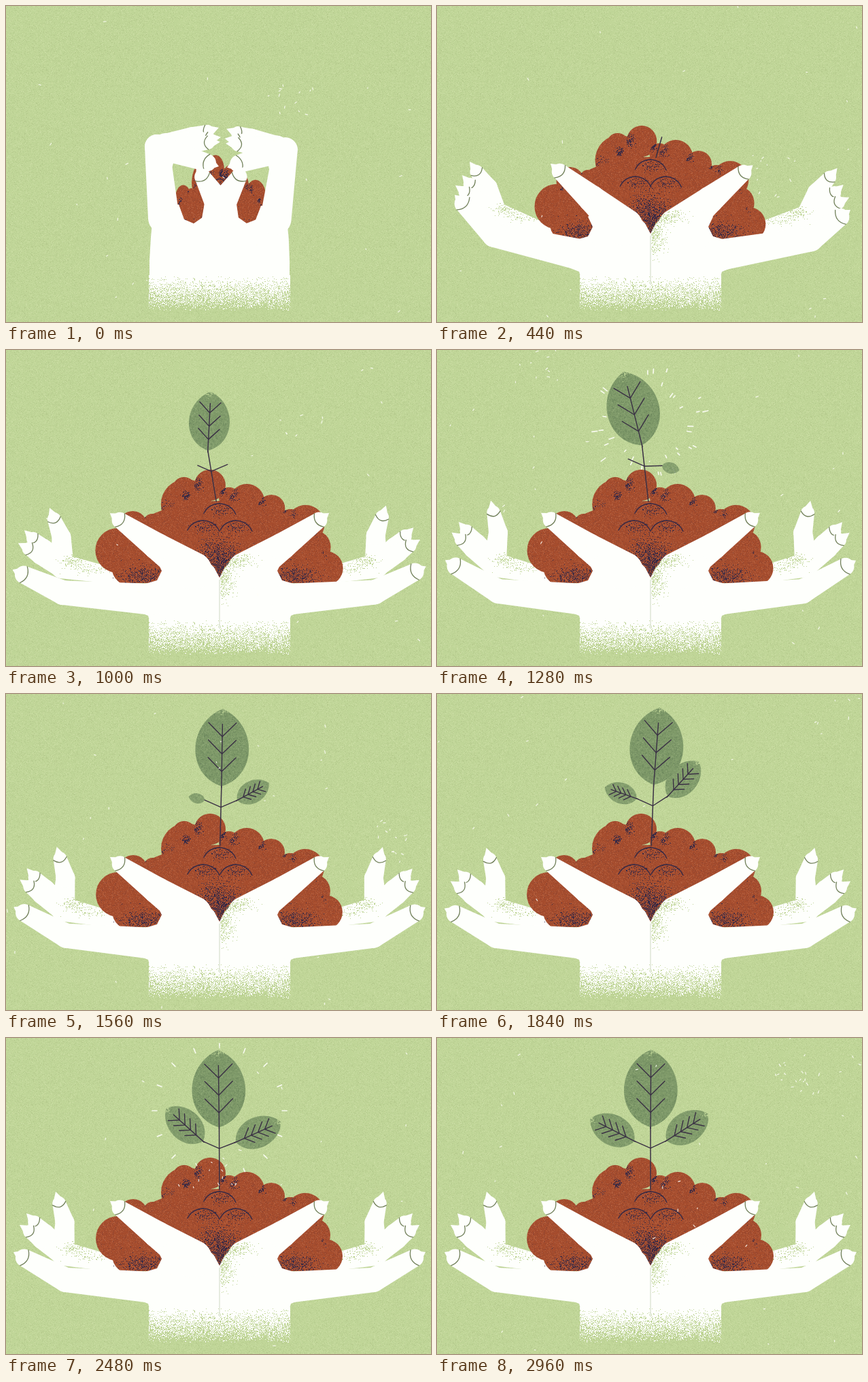
Animation of 625 by 465 pixels, one loop 3000 ms. Source, as an HTML page with a canvas:

```html
<!DOCTYPE html>
<html lang="en">
<head>
<meta charset="utf-8">
<title>Growing plant</title>
<style>
html, body { margin: 0; width: 100%; height: 100%; overflow: hidden; background: #bfd597; }
canvas { display: block; width: 625px; height: 465px; }
</style>
</head>
<body>
<canvas id="stage" width="625" height="465"></canvas>
<script>
const W = 625, H = 465, LOOP = 3000, STEP = 40, AXIS = 314, TAU = Math.PI * 2;
const ctx = document.getElementById('stage').getContext('2d');
const INK = '#3a3044', SHADE = '#382a45', NAIL = '#71805a', GREEN = '#bfd597', WHITE = '#fefffc';

// ---------- helpers ----------
function seeded(seed) {
  let s = seed * 2654435761 >>> 0;
  return () => {
    s = s + 0x6D2B79F5 >>> 0;
    let x = Math.imul(s ^ s >>> 15, s | 1);
    x ^= x + Math.imul(x ^ x >>> 7, x | 61);
    return ((x ^ x >>> 14) >>> 0) / 4294967296;
  };
}
const clamp = k => Math.max(0, Math.min(1, k));
const easeOut = k => 1 - (1 - k) ** 2;
const grow = (t, start, duration) => easeOut(clamp((t - start) / duration));
// Works on numbers, points, lists of points and objects of these.
function mix(a, b, k) {
  if (typeof a === 'number') return a + (b - a) * k;
  if (Array.isArray(a)) return a.map((v, i) => mix(v, b[i], k));
  return Object.fromEntries(Object.keys(a).map(key => [key, mix(a[key], b[key], k)]));
}
// Point at a distance from p; the angle is in degrees, clockwise from straight up.
const polar = (p, angle, r) => {
  const a = angle * Math.PI / 180;
  return [p[0] + Math.sin(a) * r, p[1] - Math.cos(a) * r];
};

function layer(w, h, paint) {
  const c = document.createElement('canvas');
  c.width = w; c.height = h;
  paint(c.getContext('2d'));
  return c;
}
function grain(seed, base, specks) {
  const tile = layer(256, 256, g => {
    const rnd = seeded(seed);
    g.fillStyle = base;
    g.fillRect(0, 0, 256, 256);
    for (let i = 0; i < 28000; i++) {
      g.fillStyle = specks[i % specks.length];
      g.fillRect(rnd() * 256 | 0, rnd() * 256 | 0, 1, 1);
    }
  });
  return ctx.createPattern(tile, 'repeat');
}
const paper = grain(1, GREEN, ['#c9dca2', '#b6cb8e', '#c4d89b']);
const earth = grain(2, '#a54c2d', ['#b5603f', '#934630', '#ab5434']);
const leafFill = grain(3, '#7f9a69', ['#6b865c', '#8fa877', '#758f63']);

const wristFade = layer(W, H, g => {
  const rnd = seeded(5);
  g.fillStyle = WHITE;
  for (let y = 396; y < 448; y++)
    for (let x = 210; x < 418; x++)
      if (rnd() > ((y - 396) / 52) ** 1.3) g.fillRect(x, y, 1, 1);
});

const scatter = (() => {
  const rnd = seeded(6);
  return Array.from({ length: 1600 }, () => {
    const r = Math.sqrt(-2 * Math.log(1 - rnd())), a = rnd() * TAU;
    return [r * Math.cos(a), r * Math.sin(a)];
  });
})();
function spray(x, y, rx, ry, n, color) {
  ctx.beginPath();
  for (const [dx, dy] of scatter.slice(0, n))
    ctx.rect(Math.round(x + dx * rx), Math.round(y + dy * ry), 1, 1);
  ctx.fillStyle = color;
  ctx.fill();
}
function line(points, color, width) {
  ctx.beginPath();
  points.forEach(p => ctx.lineTo(...p));
  ctx.strokeStyle = color;
  ctx.lineWidth = width;
  ctx.stroke();
}
function fillPoly(points) {
  ctx.beginPath();
  points.forEach(p => ctx.lineTo(...p));
  ctx.fillStyle = WHITE;
  ctx.fill();
}

// ---------- hands: a jointed left hand, mirrored for the right ----------
// soil holds the spread and height of the lumps, then their size both ways
const folded = {
  fold: 1, soil: [0.42, 0.72, 0.55, 0.9],
  root: [232, 312], knuckle: [222, 207], index: [313, 236],
  backRoot: [228, 255], backKnuckle: [235, 205], middle: [315, 200], ring: [316, 193], little: [313, 179],
  thumbRoot: [312, 335], thumbJoint: [312, 290], thumb: [280, 236]
};
const rest = {
  fold: 0, soil: [1, 1, 1, 1],
  root: [215, 367], knuckle: [88, 356], index: [11, 315],
  backRoot: [165, 334], backKnuckle: [84, 317], middle: [20, 275], ring: [30, 258], little: [73, 226],
  thumbRoot: [275, 325], thumbJoint: [222, 289], thumb: [153, 240]
};
const lifted = {
  ...rest, soil: [0.93, 1, 0.97, 1],
  knuckle: [84, 337], index: [26, 278], backKnuckle: [86, 306],
  middle: [27, 264], ring: [37, 249], little: [48, 229], thumbJoint: [228, 284], thumb: [167, 232]
};
const splayed = {
  ...rest, soil: [1.03, 1, 1, 1],
  knuckle: [60, 364], index: [1, 372], backKnuckle: [76, 327],
  middle: [5, 340], ring: [9, 309], little: [11, 270], thumb: [152, 242]
};
const openPalm = [[209,391], [192,384], [198,346], [222,339], [229,325], [222,310], [250,288], [288,302], [306,320], [315,337]];
const foldedPalm = [[211,375], [213,340], [217,300], [254,292], [262,314], [276,320], [289,311], [293,285], [308,272], [315,268]];

function poseAt(t) {
  if (t < 440) return mix(folded, lifted, (t / 440) ** 1.4);
  if (t < 760) return mix(lifted, splayed, easeOut((t - 440) / 320));
  const u = t - 760;
  return mix(rest, splayed, Math.exp(-u / 245) * Math.cos(u / 640 * Math.PI));
}
function taper(a, ra, b, rb) {
  const angle = Math.atan2(b[1] - a[1], b[0] - a[0]);
  ctx.beginPath();
  ctx.arc(...a, ra, angle + Math.PI / 2, angle - Math.PI / 2);
  ctx.arc(...b, rb, angle - Math.PI / 2, angle + Math.PI / 2);
  ctx.fillStyle = WHITE;
  ctx.fill();
}
function finger(root, joint, tip, [r0, r1, r2]) {
  const len = Math.hypot(tip[0] - joint[0], tip[1] - joint[1]);
  const ux = (tip[0] - joint[0]) / len, uy = (tip[1] - joint[1]) / len;
  const end = [tip[0] - ux * 18, tip[1] - uy * 18];
  const sides = [-1, 1].map(s => [end[0] - uy * r2 * s, end[1] + ux * r2 * s]);
  taper(root, r0, joint, r1);
  taper(joint, r1, end, r2);
  fillPoly([sides[0], tip, sides[1]]);
  ctx.beginPath();
  ctx.moveTo(...sides[0]);
  ctx.quadraticCurveTo(end[0] - ux * 11, end[1] - uy * 11, ...sides[1]);
  ctx.strokeStyle = NAIL;
  ctx.lineWidth = 1.3;
  ctx.stroke();
}
function drawBack(p) {
  taper(p.backRoot, 11, p.backKnuckle, 18);
  for (const name of ['little', 'ring', 'middle']) {
    const joint = mix(p.backKnuckle, p[name], 0.5);
    if (name === 'little') joint[0] += 8 * (1 - p.fold);
    finger(p.backKnuckle, joint, p[name], [17, 14, 10]);
  }
  if (p.fold < 0.3) {
    const [x, y] = p.backKnuckle;
    spray(x + 14, y - 8, 10, 5, 150, GREEN);
    spray(x + 40, y + 4, 17, 4, 90, GREEN);
  }
}
function drawFront(p) {
  fillPoly([[211, 398], ...mix(openPalm, foldedPalm, p.fold), [315, 398]]);
  finger(p.root, p.knuckle, p.index, [23, 18, 13]);
  finger(p.thumbRoot, p.thumbJoint, p.thumb, [28, 20, 12]);
}
function bothSides(draw, left, right) {
  draw(left);
  ctx.save();
  ctx.translate(AXIS * 2, 0);
  ctx.scale(-1, 1);
  draw(right);
  ctx.restore();
}

// ---------- soil: lumps from left to right, each shaded where it meets the last ----------
const lumps = [[165,295,33], [187,258,21], [215,253,12], [265,227,37], [262,204,17], [300,199,23],
  [328,217,15], [354,223,26], [390,233,20], [418,250,16], [440,256,28], [452,290,25], [470,321,25]];

function drawSoil([sx, sy, rx, ry]) {
  const X = x => AXIS + (x - AXIS) * sx, Y = y => 345 + (y - 345) * sy;
  const oval = (x, y, a, b, from = 0, to = 2) => {
    ctx.beginPath();
    ctx.ellipse(X(x), Y(y), a, b, 0, Math.PI * from, Math.PI * to);
  };
  ctx.save();
  ctx.beginPath();
  ctx.rect(0, 0, W, 343);
  ctx.clip();
  ctx.fillStyle = earth;
  lumps.forEach(([x, y, r], i) => {
    ctx.save();
    oval(x, y, r * rx, r * ry);
    ctx.fill();
    ctx.clip();
    if (i) {
      const [px, py] = lumps[i - 1], d = Math.hypot(px - x, py - y);
      spray(X(x + (px - x) / d * r * 0.9), Y(y + (py - y) / d * r * 0.9 - 4), r * rx / 5, r * ry / 4, 110, SHADE);
      ctx.fillStyle = earth;
    }
    ctx.restore();
  });
  for (const side of [-1, 1]) {
    oval(AXIS + side * 128, 320, 30 * rx, 28 * ry);
    ctx.fill();
  }
  oval(AXIS, 302, 150 * sx, 80 * sy);
  ctx.fill();
  for (const side of [-1, 1]) spray(X(AXIS + side * 111), Y(333), 17 * rx, 8 * ry, 480, SHADE);
  spray(X(AXIS), Y(315), 16 * rx, 19 * ry, 1600, SHADE);
  ctx.strokeStyle = SHADE;
  ctx.lineWidth = 1.4;
  for (const side of [-1, 0, 1]) {
    const x = AXIS + side * 24, y = side ? 277 : 252;
    oval(x, y, 26 * rx, 26 * ry, 1.15, 1.87);
    ctx.stroke();
    spray(X(x), Y(y - 17), 9 * rx, 5 * ry, 90, SHADE);
  }
  ctx.restore();
}

// ---------- plant ----------
function drawLeaf(base, angle, len, ratio, pairs) {
  if (len < 4) return;
  ctx.save();
  ctx.translate(...base);
  ctx.rotate((angle - 90) * Math.PI / 180);
  const h = len * ratio * 0.667;
  ctx.beginPath();
  ctx.moveTo(0, 0);
  ctx.bezierCurveTo(len * 0.14, -h, len * 0.8, -h, len, 0);
  ctx.bezierCurveTo(len * 0.8, h, len * 0.14, h, 0, 0);
  ctx.globalAlpha = 0.85 + 0.15 * clamp(len / 70 - 0.5);
  ctx.fillStyle = leafFill;
  ctx.fill();
  ctx.globalAlpha = 1;
  if (len > 60) spray(len * 0.98, 0, len * 0.045, h * 0.22, 110, GREEN);
  if (len > 32) {
    line([[-2, 0], [len * 0.8, 0]], INK, 1.4);
    for (let i = 0; i < pairs; i++) {
      const x = len * mix(0.19, 0.64, i / (pairs - 1)), arm = len * ratio * 0.26;
      line([[x + arm, -arm], [x, 0], [x + arm, arm]], INK, 1.4);
    }
  }
  ctx.restore();
}
function drawPlant(t) {
  if (t <= 400) return;
  const swing = (peak, decay, period) => Math.exp(-Math.abs(t - peak) / decay) * Math.cos((t - peak) / period * TAU);
  const u = Math.max(0, t - 440);
  const stem = 16 * Math.exp(-((u / 1000) ** 2)) * Math.cos(u / 1400 * TAU);
  const lean = t < 760 ? 40 * grow(t, 400, 360) : 40 * swing(760, 495, 1040);
  const rightSwing = 45 * swing(1280, 600, 1160);
  const leftAngle = -63 + 15 * Math.cos((t - 2480) / 1920 * TAU);

  const root = [AXIS + stem / 2, 223];
  const node = polar(root, stem, 61 * (1 - Math.exp((400 - t) / 450)));
  const top = polar(node, stem, 31 * grow(t, 380, 100));
  const left = polar(node, -66, 26 * grow(t, 700, 500));
  const right = polar(node, 66 + rightSwing / 2, 26 * grow(t, 640, 200));
  drawLeaf(top, lean, 114 * grow(t, 580, 820), 0.69, 3);
  drawLeaf(left, leftAngle, 73 * grow(t, 1360, 1100), 0.62, 4);
  drawLeaf(right, 60 + rightSwing, 73 * grow(t, 1080, 1000), 0.62, 4);
  line([root, node, top], INK, 1.5);
  line([left, node, right], INK, 1.4);
}

// ---------- sparks and dust ----------
function dash(x, y, angle, len) {
  ctx.moveTo(x, y);
  ctx.lineTo(x + Math.cos(angle) * len, y + Math.sin(angle) * len);
}
function drawSparks(t) {
  ctx.strokeStyle = '#f8fbee';
  ctx.lineWidth = 1.7;
  ctx.beginPath();
  if (t >= 1120 && t < 1480) {
    const rnd = seeded(21), spread = (t - 1120) / 160;
    for (let i = 0; i < 38; i++) {
      const a = i * 0.331 + rnd() * 0.2, r = 38 + spread * (12 + rnd() * 32);
      dash(313 + Math.cos(a) * r, 110 + Math.sin(a) * r, a, 3 + rnd() * 5);
    }
  }
  if (t >= 2360 && t < 2640) {
    const r = 92 + (t - 2480) * 0.12;
    for (let a = 0; a < TAU; a += TAU / 16)
      dash(AXIS + Math.cos(a) * r, 107 + Math.sin(a) * r, a, 7);
  }
  ctx.stroke();
}
function drawDust(t) {
  const rnd = seeded(100 + t / STEP), amount = 12 + 55 * rnd() ** 2;
  const cx = rnd() * W, cy = rnd() * H * 0.6;
  ctx.strokeStyle = 'rgba(255,255,248,.85)';
  ctx.lineWidth = 1.2;
  ctx.beginPath();
  for (let i = 0; i < amount; i++) {
    const near = i % 3 === 0;
    const x = near ? cx + (rnd() - 0.5) * 70 : rnd() * W;
    const y = near ? cy + (rnd() - 0.5) * 60 : rnd() * H;
    dash(x, y, rnd() * TAU, 1 + rnd() * 3);
  }
  ctx.stroke();
}
function drawPalmShade() {
  ctx.save();
  ctx.beginPath();
  ctx.moveTo(315, 412);
  ctx.lineTo(315, 334);
  ctx.quadraticCurveTo(322, 308, 350, 298);
  ctx.lineTo(385, 280);
  ctx.lineTo(385, 412);
  ctx.clip();
  spray(318, 334, 9, 17, 520, GREEN);
  spray(336, 309, 14, 6, 260, GREEN);
  ctx.restore();
  line([[314, 338], [314, 410]], '#cfd8c4', 1);
}

function draw(t) {
  // the right hand runs one step ahead
  const left = poseAt(t), right = poseAt(t + STEP);
  ctx.fillStyle = paper;
  ctx.fillRect(0, 0, W, H);
  drawSparks(t);
  bothSides(drawBack, left, right);
  drawSoil(left.soil);
  drawPlant(t);
  bothSides(drawFront, left, right);
  ctx.drawImage(wristFade, 0, 0);
  if (left.fold < 0.3) drawPalmShade();
  drawDust(t);
}

ctx.lineCap = ctx.lineJoin = 'round';
const start = performance.now();
let shown = -1;
function tick(now) {
  const t = Math.floor(Math.max(0, now - start) % LOOP / STEP) * STEP;
  if (t !== shown) draw(shown = t);
  requestAnimationFrame(tick);
}
draw(0);
requestAnimationFrame(tick);
</script>
</body>
</html>
```
